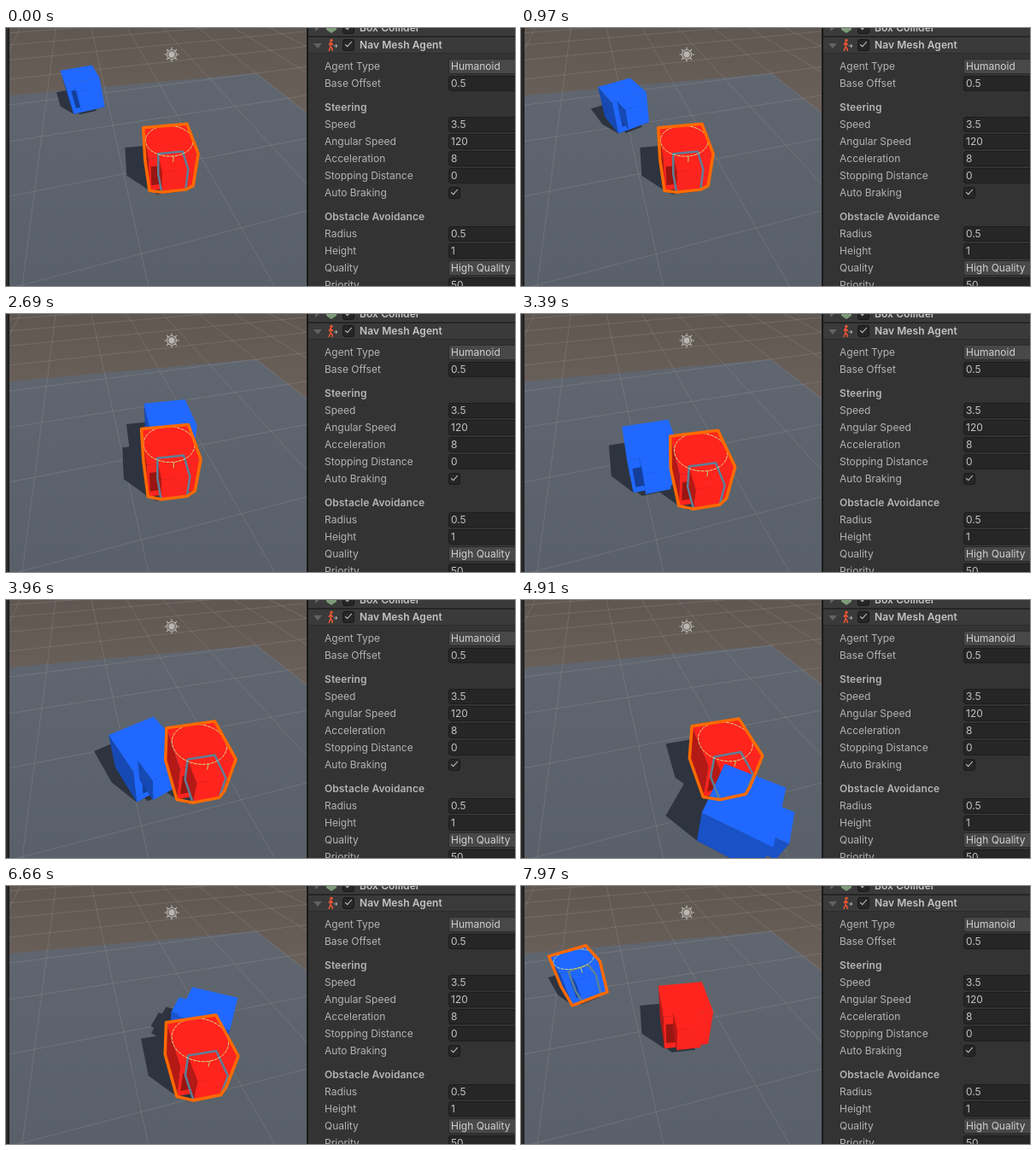
These frames come from a looping animation (596x302 px, 8000 ms). An HTML page with a canvas:

```html
<!DOCTYPE html>
<html lang="en">
<head>
<meta charset="utf-8">
<title>Nav Mesh Agent</title>
<style>
html, body { margin: 0; width: 596px; height: 302px; overflow: hidden; background: #333; }
canvas { position: absolute; left: 0; top: 0; }
#panel { position: absolute; left: 354px; top: 0; width: 242px; height: 302px; overflow: hidden;
  background: #333; color: #b4b4b4; font: 12px/18px Inter, "Liberation Sans", sans-serif; white-space: nowrap; }
#panel > * { position: absolute; box-sizing: border-box; }
.bar { left: 0; width: 242px; height: 20px; background: #3a3a3a; border-top: 1px solid #1f1f1f; border-bottom: 1px solid #2c2c2c; }
.label { left: 19px; }
.bold, .title { font-weight: 600; letter-spacing: 0.08px; }
.title { left: 60px; color: #c4c4c4; }
.field { left: 164px; width: 90px; height: 18px; line-height: 16px; padding-left: 2px;
  background: #262626; border: 1px solid #1d1d1d; border-radius: 3px; color: #c4c4c4; }
.menu { background: #484848; border-color: #2b2b2b; color: #d0d0d0; }
.check { width: 14px; height: 14px; background: #262626; border: 1px solid #191919; border-radius: 3px; }
.check::after { content: ""; position: absolute; left: 4px; top: 0; width: 3px; height: 7px;
  border: solid #d4d4d4; border-width: 0 1.7px 1.7px 0; transform: rotate(42deg); }
svg { left: 0; top: 0; }
</style>
</head>
<body>
<canvas id="view" width="354" height="302"></canvas>
<div id="panel">
  <div class="bar" style="top:-10px"></div>
  <div class="bar" style="top:10px"></div>
  <div class="title" style="top:-9px">Box Collider</div>
  <div class="title" style="top:11px">Nav Mesh Agent</div>
  <svg width="60" height="30" fill="none">
    <path d="M6 18h10l-5 6z M8 -4l5 4l-5 4z" fill="#626262"/>
    <path d="M21 -4h12v6l-6 4l-6 -4z" fill="#7d9b78"/>
    <circle cx="27" cy="14.5" r="1.7" fill="#ee5533"/>
    <path d="M27 17l-1 5l2 2v3M26 22l-2 5M24 20l2 -3l3 3" stroke="#ee5533" stroke-width="1.5"/>
    <path d="M30 21h4m-2 -2l2 2l-2 2" stroke="#b4b4b4"/>
  </svg>
</div>
<script>
const panel = document.getElementById('panel');
function add(cls, y, text = '', x) {
  const el = document.createElement('div');
  el.className = cls;
  el.style.top = y + 'px';
  if (x) el.style.left = x + 'px';
  el.textContent = text;
  panel.append(el);
}
const groups = {
  '': ['Agent Type: Humanoid', 'Base Offset: 0.5'],
  'Steering': ['Speed: 3.5', 'Angular Speed: 120', 'Acceleration: 8', 'Stopping Distance: 0', 'Auto Braking: on'],
  'Obstacle Avoidance': ['Radius: 0.5', 'Height: 1', 'Quality: High Quality', 'Priority: 50']
};
let top0 = 36;
for (const [heading, rows] of Object.entries(groups)) {
  if (heading) {
    add('label bold', top0 + 8, heading);
    top0 += 28;
  }
  for (const row of rows) {
    const [name, value] = row.split(': ');
    add('label', top0, name);
    if (value === 'on') add('check', top0 + 2, '', 164);
    else add(isNaN(value) ? 'field menu' : 'field', top0, value);
    top0 += 20;
  }
}
add('check', -7, '', 40);
add('check', 13, '', 40);

const ctx = document.getElementById('view').getContext('2d');
const LOOP = 8000, CUT = 7210;

// Camera: screen centre, focal length, height and downward pitch
const CX = 178, CY = 151, F = 280, H = 4.25;
const rad = deg => deg * Math.PI / 180;
const PITCH = rad(44), COS = Math.cos(PITCH), SIN = Math.sin(PITCH);
// Offset of a shadow for each unit of height
const SUN = [-0.55, 0.45];

const depth = (d, h) => d * COS + (H - h) * SIN;
function project([x, d, h]) {
  const z = depth(d, h);
  return [CX + F * x / z, CY + F * ((H - h) * COS - d * SIN) / z];
}
function unproject(sx, sy, h) {
  const d = (H - h) / Math.tan(PITCH + Math.atan((sy - CY) / F));
  return [(sx - CX) * depth(d, h) / F, d];
}

// Waypoints: time, screen centre of the top face, heading in degrees (0 faces the camera)
const chase = [
  [420, 86, 54, 24], [1710, 161, 96, 46], [2690, 191, 117, 10], [3400, 150, 146, 14],
  [3960, 162, 165, 32], [4700, 190, 195, 45], [4910, 263, 234, 62], [5460, 306, 188, 145],
  [6310, 266, 143, 235], [6660, 238, 141, 248], [7140, 222, 152, 370]
];
const drift = [[7690, 60, 80, 30], [7970, 62, 85, 35]];
const pushed = [
  [2060, 191, 131], [2690, 191, 151], [3960, 226, 167], [4450, 239, 164],
  [5530, 239, 164], [6660, 227, 178], [7140, 222, 193]
];
function track(keys, t) {
  const next = keys.findIndex(k => k[0] > t);
  if (next <= 0) return keys.at(next).slice(1);
  const a = keys[next - 1], b = keys[next];
  const p = (t - a[0]) / (b[0] - a[0]);
  return a.slice(1).map((v, i) => v + (b[i + 1] - v) * p);
}
const bluePose = t => track(t < CUT ? chase : drift, t);
function redPose(t) {
  const [x, y] = track(pushed, t < CUT ? t : 0);
  return [x, y, 8 + (x - 191) / 10];
}

function trace(points, close = true) {
  ctx.beginPath();
  points.forEach(p => ctx.lineTo(...p));
  if (close) ctx.closePath();
}
function fill(points, color) {
  trace(points);
  ctx.fillStyle = color;
  ctx.fill();
}
function stroke(points, color, width, close = true) {
  trace(points, close);
  ctx.strokeStyle = color;
  ctx.lineWidth = width;
  ctx.stroke();
}
function hull(points) {
  const sorted = [...points].sort((a, b) => a[0] - b[0] || a[1] - b[1]);
  const half = list => {
    const out = [];
    for (const p of list) {
      while (out.length > 1) {
        const [a, b] = out.slice(-2);
        if ((b[0] - a[0]) * (p[1] - a[1]) - (b[1] - a[1]) * (p[0] - a[0]) > 0) break;
        out.pop();
      }
      out.push(p);
    }
    return out.slice(0, -1);
  };
  return [...half(sorted), ...half(sorted.reverse())];
}

// Boxes in local units
const BODY = { w: 0.5, back: -0.5, front: 0.5, low: 0, high: 1 };
const NOSE = { w: 0.26, back: 0.2, front: 0.72, low: 0.18, high: 0.82 };

function makeAgent([sx, sy, deg], rgb) {
  const [cx, cd] = unproject(sx, sy, 1);
  const s = Math.sin(rad(deg)), c = Math.cos(rad(deg));
  const place = (u, v, h) => [cx + u * c + v * s, cd + u * s - v * c, h];
  return { rgb, s, c, cd, place };
}
function corners({ place }, { w, back, front, low, high }) {
  return [low, high].flatMap(h =>
    [[-w, front], [w, front], [w, back], [-w, back]].map(([u, v]) => place(u, v, h)));
}
const shade = (rgb, k) => `rgb(${rgb.map(v => Math.round(v * Math.min(1, k))).join()})`;

function drawBox(agent, box) {
  const pts = corners(agent, box), flat = pts.map(project);
  const { s, c, rgb } = agent;
  [[s, -c], [c, s], [-s, c], [-c, -s]].forEach(([nx, nd], i) => {
    const j = (i + 1) % 4;
    if (nx * pts[i][0] + nd * pts[i][1] >= 0) return;
    const light = Math.max(0, -(nx * SUN[0] + nd * SUN[1]));
    const face = [flat[i], flat[j], flat[j + 4], flat[i + 4]];
    fill(face, shade(rgb, 0.7 + 0.55 * light));
    if (i === 0 && box === BODY && light) drawNoseShade(agent, face);
  });
  fill(flat.slice(4), shade(rgb, 1));
}
// Shadow of the nose on the front of the body
function drawNoseShade({ s, c, place, rgb }, face) {
  const slide = Math.max(-0.2, Math.min(0.2, 0.4 * (SUN[0] * c + SUN[1] * s)));
  const { w, low, high } = NOSE;
  const pts = [-w, w].flatMap(u => [low, high - 0.05].map(h => place(u + slide, 0.5, h)));
  ctx.save();
  trace(face);
  ctx.clip();
  fill(hull(pts.map(project)), shade(rgb, 0.6));
  ctx.restore();
}
function drawAgent(agent) {
  const [nx, nd] = agent.place(0, 0.5, 0);
  const facing = agent.s * nx - agent.c * nd < 0;
  (facing ? [BODY, NOSE] : [NOSE, BODY]).forEach(box => drawBox(agent, box));
}
function drawShadow(agent) {
  for (const box of [BODY, NOSE]) {
    const pts = corners(agent, box).map(([x, d, h]) => project([x + SUN[0] * h, d + SUN[1] * h, 0]));
    fill(hull(pts), '#2d343f');
  }
}
function drawSelection(agent) {
  const nose = corners(agent, NOSE).map(project);
  const body = corners(agent, BODY).map(project);
  stroke(hull(nose), '#5c7f98', 2.5);
  const ring = [];
  for (let a = 0; a < 360; a += 6)
    ring.push(project(agent.place(Math.cos(rad(a)) / 2, Math.sin(rad(a)) / 2, 1)));
  ctx.setLineDash([4, 1]);
  stroke(ring, '#d5dc8c', 1);
  ctx.setLineDash([]);
  stroke([1, 0.84].map(h => project(agent.place(0, 0.5, h))), '#b9d873', 1, false);
  stroke(hull([...body, ...nose]), '#ff6a00', 3.5);
}

const CORNER = [293, 53];
const origin = unproject(...CORNER, 0);
function drawGrid() {
  const s = Math.sin(rad(15)), c = Math.cos(rad(15));
  for (let k = -12; k <= 8; k += 2)
    for (const [ax, ad, bx, bd] of [[c, s, -s, c], [-s, c, c, s]]) {
      const line = [];
      for (let m = -20; m <= 20; m++) {
        const d = origin[1] + ad * k + bd * m;
        if (depth(d, 0) > 0.5) line.push(project([origin[0] + ax * k + bx * m, d, 0]));
      }
      stroke(line, 'rgba(190,180,178,0.2)', 1, false);
    }
}
function drawSun() {
  const [x, y] = [194, 31], color = '#b9b5b0';
  const ring = (r, from = 0) => {
    ctx.beginPath();
    for (let a = 0; a <= 360; a += 45) {
      const dx = Math.cos(rad(a)), dy = Math.sin(rad(a));
      ctx.moveTo(x + dx * from, y + dy * from);
      ctx.lineTo(x + dx * r, y + dy * r);
    }
    ctx.arc(x, y, from, 0, 7);
  };
  ctx.strokeStyle = ctx.fillStyle = color;
  ctx.lineWidth = 1.2;
  ring(8.5, 5.5);
  ctx.stroke();
  ctx.beginPath();
  ctx.arc(x, y, 3.7, 0, 7);
  ctx.fill();
}
function gradient(top, bottom, y0, y1) {
  const g = ctx.createLinearGradient(0, y0, 0, y1);
  g.addColorStop(0, top);
  g.addColorStop(1, bottom);
  return g;
}
const sky = gradient('#5f5751', '#6a605a', 0, 90);
const ground = gradient('#60666f', '#596069', 55, 302);

function draw(t) {
  ctx.lineJoin = 'round';
  ctx.fillStyle = sky;
  ctx.fillRect(0, 0, 354, 302);
  fill([[4, 79], CORNER, [352, 99], [352, 302], [4, 302]], ground);
  drawGrid();
  drawSun();
  const red = makeAgent(redPose(t), [255, 36, 30]);
  const blue = makeAgent(bluePose(t), [32, 104, 255]);
  const agents = [red, blue].sort((a, b) => b.cd - a.cd);
  agents.forEach(drawShadow);
  agents.forEach(drawAgent);
  drawSelection(t < CUT ? red : blue);
  ctx.fillStyle = '#292929';
  ctx.fillRect(0, 0, 3, 302);
  ctx.fillStyle = '#191919';
  ctx.fillRect(3, 0, 1, 302);
  ctx.fillRect(352, 0, 2, 302);
}

const start = performance.now();
function tick() {
  draw((performance.now() - start) % LOOP);
  requestAnimationFrame(tick);
}
tick();
</script>
</body>
</html>
```
